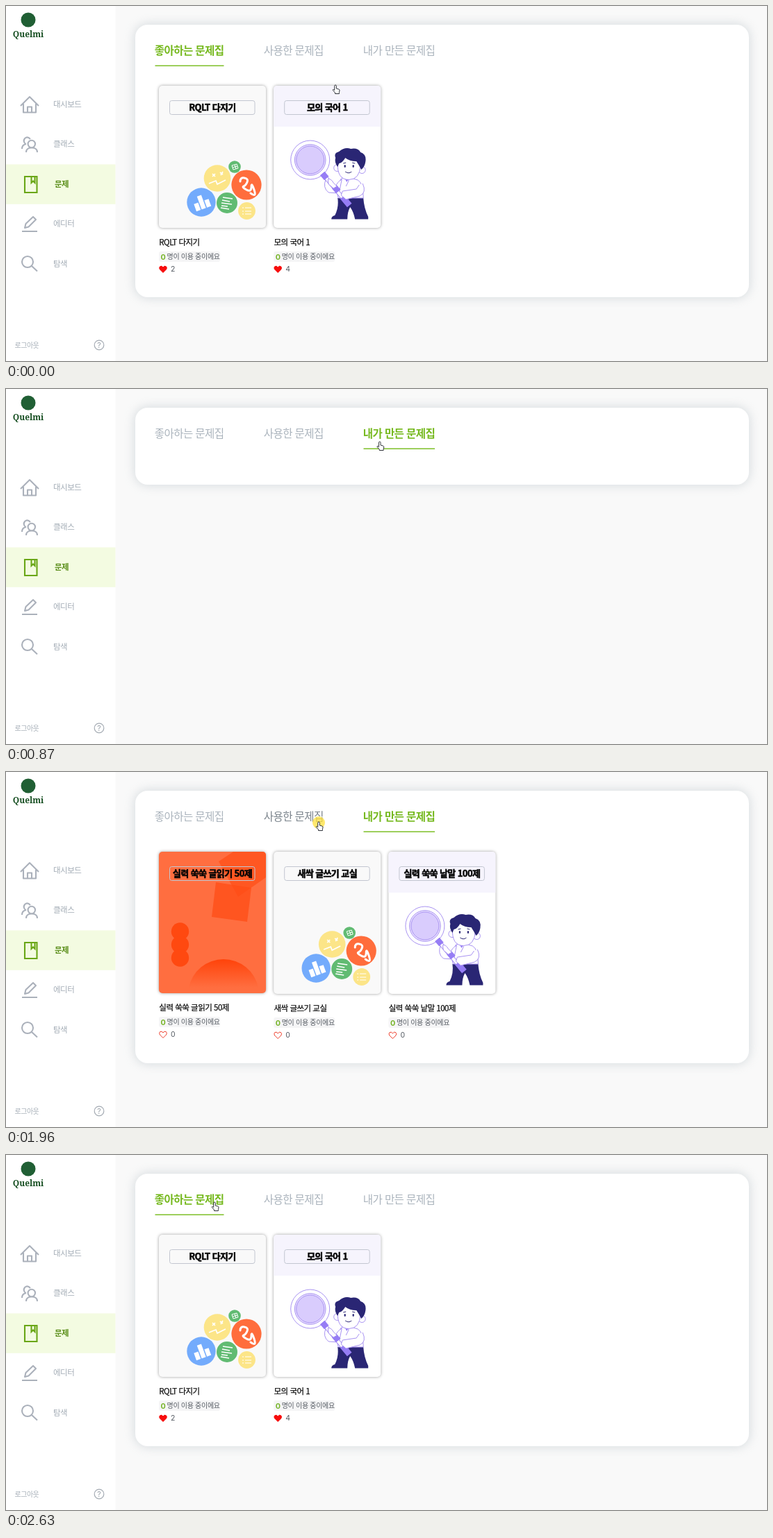
Write an HTML page that moves like this. It is 1095 by 512 pixels and loops after 3440 ms.

```html
<!DOCTYPE html>
<html lang="ko">
<head>
<meta charset="utf-8">
<style>
  html, body { margin: 0; width: 100%; height: 100%; overflow: hidden; background: #f9f9f9; }
  svg { display: block; width: 100vw; height: 100vh; }
  text { font-family: 'Noto Sans CJK KR', 'Noto Sans CJK', 'Noto Sans', sans-serif; }
  .icon { fill: none; stroke: #abb1bb; stroke-width: 2.1; stroke-linejoin: round; }
  .menu { font-size: 11.5px; letter-spacing: -.5px; fill: #a4adb6; }
  .tab { font-size: 15.6px; letter-spacing: -.65px; }
  .title { font-size: 13px; font-weight: 900; letter-spacing: -.6px; text-anchor: middle; fill: #050505; stroke: #050505; stroke-width: .5; }
  .caption { font-size: 11.5px; font-weight: 500; letter-spacing: -.5px; fill: #111; stroke: #111; stroke-width: .25; }
  .note { font-size: 10px; letter-spacing: -.3px; fill: #555b63; }
  .num { font: 10.5px Inter, sans-serif; fill: #555b63; }
  .users { font: 700 10.8px Inter, sans-serif; fill: #78b52b; }
  .line { fill: #fff; stroke: #a892f2; stroke-width: 1; stroke-linejoin: round; }
  .white { fill: none; stroke: #fff; stroke-width: 1.7; }
  .card { filter: drop-shadow(0 0 2px rgba(0, 0, 0, .38)); }
  #panel { filter: drop-shadow(0 0 8px rgba(150, 164, 176, .4)); }
</style>
</head>
<body>
<svg id="stage" viewBox="0 0 1095 512" preserveAspectRatio="none"></svg>
<script>
const LOOP = 3440;
const GREEN = '#76b91f', NAVY = '#2a2674', VIOLET = '#967df5';

const tabs = [
  { name: '좋아하는 문제집', x: 214.5, w: 99 },
  { name: '사용한 문제집', x: 371.5, w: 85.5 },
  { name: '내가 만든 문제집', x: 514.5, w: 102.5 }
];
// art, title, users, likes, heart style
const pages = [
  [['blobs', 'RQLT 다지기', 0, 2, 'full'], ['boy', '모의 국어 1', 0, 4, 'full']],
  [['boy', '우리의 재치를 겨뤄봐', 5, 5, 'pale']],
  [['shapes', '실력 쑥쑥 글읽기 50제', 0, 0, 'open'],
   ['blobs', '새싹 글쓰기 교실', 0, 0, 'open'],
   ['boy', '실력 쑥쑥 낱말 100제', 0, 0, 'open']]
];
const hearts = {
  full: 'fill="#f70d0d" stroke="#f70d0d"',
  open: 'fill="#fff" stroke="#ee3d2b"',
  pale: 'fill="#fffde0" stroke="#6d5a2c"'
};

// time, tab, loaded
const phases = [[0, 0, 1], [330, 1, 0], [470, 1, 1], [810, 2, 0], [880, 2, 1],
  [2030, 1, 0], [2100, 1, 1], [2560, 0, 0], [2630, 0, 1]];
// time, pointer tip x, y
const route = [[0, 474, 114], [60, 474, 114], [270, 463, 78], [560, 463, 78], [680, 537, 76],
  [940, 538, 76], [1570, 538, 76], [1820, 450, 72], [2020, 450, 72], [2160, 334, 72],
  [2290, 300, 68], [LOOP, 300, 68]];
const clicks = [[270, 330], [750, 810], [1960, 2030], [2500, 2560]];

const circle = (x, y, r, fill, more = '') => `<circle cx="${x}" cy="${y}" r="${r}" fill="${fill}" ${more}/>`;
const rect = (x, y, w, h, fill, more = '') =>
  `<rect x="${x}" y="${y}" width="${w}" height="${h}" fill="${fill}" ${more}/>`;
const path = (d, more) => `<path d="${d}" ${more}/>`;
const text = (x, y, cls, str, more = '') => `<text x="${x}" y="${y}" class="${cls}" ${more}>${str}</text>`;

const art = {
  blobs: () => rect(0, 0, 154, 205, '#f9f9f9', 'rx="5" class="card"') +
    circle(84, 133.5, 19.3, '#fce588') + circle(109, 117, 8.8, '#61bb72') +
    circle(126, 143, 21.6, '#ff6d3c') + circle(61, 168, 20.7, '#73abfc') +
    circle(98, 169, 15, '#61bb72') + circle(126.5, 180.5, 12.4, '#fce588') +
    `<g transform="rotate(-20 61 168)">${rect(50, 167, 6.5, 11, '#fff')}${rect(58, 158, 6.5, 20, '#fff')}${rect(66, 167, 6.5, 11, '#fff')}</g>` +
    path('M72 141l10-4 2 5 12-6M77 127l4 4m0-4l-4 4M88 125l4 3m0-4l-3 5', 'class="white"') +
    path('M117 138Q117 132 123 133T127 139T122 145T126 150T133 146T137 150T132 155', 'class="white" style="stroke-width:3;stroke-linecap:round"') +
    path('M92 161l14 2M91 165l11 2M90 169l15 2M90 173l9 1M89 176l12 2', 'class="white"') +
    path('M120 176h2m2 0h9M120 181h2m2 0h9M120 185h2m2 0h9', 'class="white" style="stroke-width:1.2"') +
    path('M105 115l7-2 2 6-7 2zM109 114l2 6M106 118l7-2', 'class="white" style="stroke-width:1"'),

  shapes: () => rect(0, 0, 154, 204, '#ff6e40', 'rx="5" class="card"') +
    path('M86 14L107 0H149Q154 0 154 5V37L114 65Z', 'fill="#ff4d16" opacity=".7"') +
    path('M82 44L133 52L127 101L76 94Z', 'fill="#ff4d16" opacity=".75"') +
    [115, 134, 153].map(y => circle(30.5, y, 12.7, '#ff4910')).join('') +
    path('M43 196A51 51 0 0 1 143 196Z', 'fill="url(#sunset)"'),

  boy: () => rect(0, 0, 154, 205, '#fff', 'rx="5" class="card"') +
    path('M0 59V5Q0 0 5 0H149Q154 0 154 5V59Z', 'fill="#f6f4fd"') +
    // trousers
    path('M92 162H129Q130 177 136 189V192.500H117Q115 182 110 175Q106 182 106 192.500H83Q83 188 88 187Q94 175 92 162Z', `fill="${NAVY}"`) +
    // shirt and sleeves
    path('M97 134Q108 131 121 136Q129 140 129 162H93L90 150Z', 'class="line"') +
    path('M75 135Q70 147 79 154L94 155L98 135Q91 139 89 146L84 144Z', 'class="line"') +
    // lens and handle
    circle(52.5, 107, 28, '#fff', 'stroke="#a892f2"') +
    circle(52.5, 107, 22.3, '#e9e0ff', 'stroke="#a892f2"') +
    circle(52.5, 107, 20, '#d9ccfd', 'stroke="#a892f2"') +
    path('M72 129L107 171', 'stroke="#a892f2" stroke-width="6"') +
    path('M72 129L107 171', 'stroke="#fff" stroke-width="4"') +
    path('M70 126.500L76 133.500M87 145.500L93 152.500M99 160.500L109 172.500', `stroke="${VIOLET}" stroke-width="8.600"`) +
    path('M78 135Q82 133 86 140L91 145L86 148L79 142Z', 'class="line"') +
    path('M128 141Q134 154 124 159L104 164L97 158L99 152L119 149L123 143', 'class="line"') +
    path('M105 133L108 137L104 145', 'class="line"') +
    path('M102 133L108 134L105 139Z', `fill="${VIOLET}"`) +
    // head
    circle(91.5, 118.5, 5, '#fff', 'stroke="#a892f2"') + circle(127, 121.5, 5, '#fff', 'stroke="#a892f2"') +
    path('M92 111Q91 135.500 108 135.500Q124 135.500 125 114Q118 101 105 102Z', 'class="line"') +
    path('M92 117Q87 110 89 104Q86 97 94 95Q102 88 111 91Q121 89 125 96Q134 99 132 110Q131 117 126 121Q123 115 119 109Q109 109 103 104Q99 111 94 112Z', `fill="${NAVY}"`) +
    path('M100 112l4-1M113 111l4 1', `fill="none" stroke="${NAVY}"`) +
    `<ellipse cx="102.5" cy="116" rx="1.2" ry="2" fill="${NAVY}"/><ellipse cx="114.5" cy="116" rx="1.2" ry="2" fill="${NAVY}"/>` +
    path('M103 124Q108 127.500 112 124', `fill="none" stroke="${NAVY}"`)
};

function card([kind, title, users, likes, heart], i) {
  const drop = kind === 'shapes' ? -1 : 0;
  return `<g transform="translate(${220 + i * 165.2} 115)">${art[kind]()}
    ${rect(15.5, 21.5, 122.5, 20, 'none', 'rx="3" stroke="#c2c6d0"')}
    ${text(77, 36, 'title', title)}
    <g transform="translate(0 ${drop})">
      ${text(0.3, 230, 'caption', title)}
      ${rect(0, 239, 88, 15, '#f5f5f6', 'rx="3"')}
      ${text(2.5, 250.5, 'users', users)}${text(11.5, 250.2, 'note', '명이 이용 중이에요')}
      ${path('M6 269.5L1.5 265Q-.3 262.5 1.6 260.7Q4 259 6 262Q8 259 10.4 260.7Q12.3 262.5 10.5 265Z', hearts[heart])}
      ${text(17, 268.3, 'num', likes)}
    </g></g>`;
}

const icons = [
  'M21 144L34 131L47 144M25 141V153.5H43V141M31 153V145.5H37V153',
  'M42 199a5.2 5.2 0 1 1-10.4 0a5.2 5.2 0 1 1 10.4 0M29 211Q29 204.5 37 204.5T45 211M35 192Q31 187.5 27 191Q24 195 28 199M23 206Q23 200 29 199',
  'M27 246H44.5V269H27ZM36.5 246V255L39 252.5L41.5 255V246',
  'M27 320L28.5 314L39 304L43 308L32.5 318.5ZM23 325H45',
  'M39 369a8 8 0 1 1-16 0a8 8 0 1 1 16 0M37 375L45 382.5'
];
const labels = ['대시보드', '클래스', '문제', '에디터', '탐색'];
const menu = labels.map((label, i) => {
  const on = i === 2;
  return path(icons[i], `class="icon" ${on ? 'style="stroke:#69a616;stroke-linejoin:miter"' : ''}`) +
    text(on ? 70 : 68, 146 + i * 57.4, 'menu', label, on ? 'style="fill:#5c8f1c;font-weight:700"' : '');
}).join('');

const $ = id => document.getElementById(id);
$('stage').innerHTML = `
  <defs><linearGradient id="sunset" x1="0" y1="0" x2="0" y2="1">
    <stop stop-color="#ff430a"/><stop offset="1" stop-color="#ff6e40"/>
  </linearGradient></defs>
  ${rect(0, 0, 1095, 512, '#f9f9f9')}${rect(0, 0, 157.5, 512, '#fff')}
  ${rect(0, 228.4, 157.5, 57.4, '#f3fbe1')}
  ${circle(32, 20, 10.5, '#205f34')}
  ${text(32, 45, '', 'Quelmi', `text-anchor="middle" style="font:bold 12px 'Noto Serif',serif;fill:#174f22"`)}
  ${menu}
  ${text(12.5, 493, 'menu', '로그아웃', 'style="font-size:10px"')}
  ${circle(134, 489, 6.8, 'none', 'stroke="#a4abb3" stroke-width="1.2"')}
  ${text(134, 492.7, 'num', '?', 'text-anchor="middle" style="fill:#969ea7"')}
  ${rect(186, 27, 883, 393, '#fff', 'rx="18" id="panel"')}
  ${tabs.map((tab, i) => text(tab.x - 0.7, 70, 'tab', tab.name, `id="tab${i}"`)).join('')}
  ${rect(0, 85.3, 0, 1.7, '#8cc63f', 'id="underline"')}
  ${pages.map((page, i) => `<g id="page${i}">${page.map(card).join('')}</g>`).join('')}
  <g id="cursor">
    ${circle(0, 1, 9, '#ffe03c', 'id="click" opacity=".75"')}
    ${path('M-1.3 1.2Q-1.3 0 0 0T1.3 1.2V5L4.8 6Q6.2 6.4 6 8L5.4 10.5V12.5H-.5V11L-3.6 7.6Q-4.2 6.2-2.5 6.5L-1.3 7.5Z', 'id="hand" fill="#fff" stroke="#30343a"')}
    ${path('M0 0V10L2.3 8L3.9 11.5L5.5 10.8L4 7.3H7.2Z', 'id="arrow" fill="#fff" stroke="#30343a"')}
  </g>`;

const show = (id, on) => $(id).setAttribute('visibility', on ? 'visible' : 'hidden');

function pointer(t) {
  const i = route.findIndex(key => key[0] > t);
  const [t0, x0, y0] = route[i - 1], [t1, x1, y1] = route[i];
  const k = (t - t0) / (t1 - t0);
  return [x0 + (x1 - x0) * k, y0 + (y1 - y0) * k];
}

function draw() {
  const t = performance.now() % LOOP;
  const [, active, loaded] = phases.filter(phase => phase[0] <= t).pop();
  const [x, y] = pointer(t);
  const hovered = y > 95 ? -1 : tabs.findIndex(tab => x > tab.x - 10 && x < tab.x + tab.w + 10);

  $('panel').setAttribute('height', loaded ? 393 : 111);
  $('underline').setAttribute('x', tabs[active].x);
  $('underline').setAttribute('width', tabs[active].w);
  tabs.forEach((tab, i) => {
    const label = $('tab' + i);
    label.style.fill = i === active ? GREEN : i === hovered ? '#7c858d' : '#abb4bd';
    label.style.fontWeight = i === active ? 700 : 400;
    show('page' + i, loaded && i === active);
  });

  $('cursor').setAttribute('transform', `translate(${x} ${y})`);
  const hand = hovered >= 0 || y > 108;
  show('hand', hand);
  show('arrow', !hand);
  show('click', clicks.some(([from, to]) => t >= from && t < to));
  requestAnimationFrame(draw);
}
draw();
</script>
</body>
</html>
```
